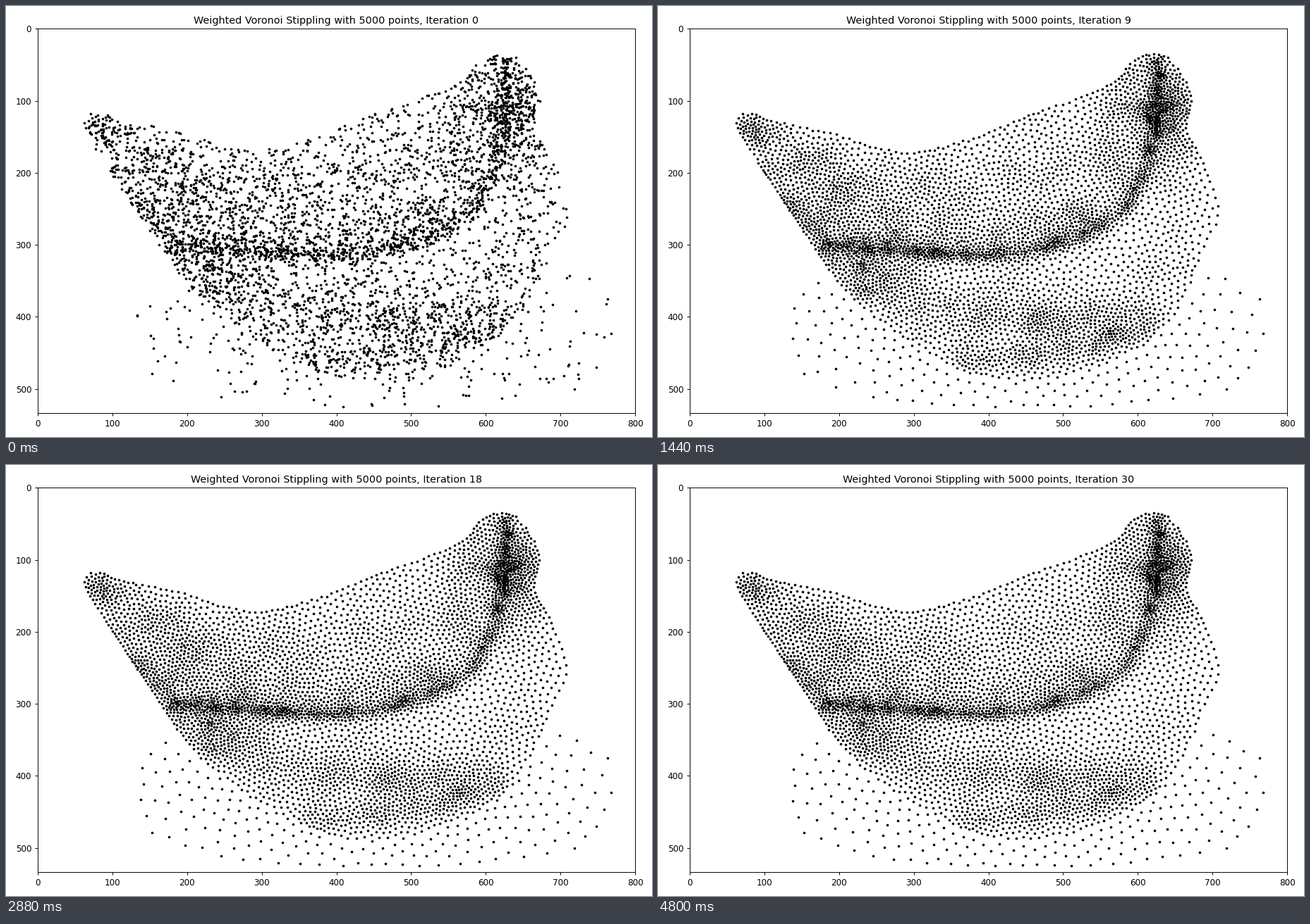
A matplotlib script for the animation above (4960 ms loop, 916 px wide and 612 px high).

```python
from itertools import product

import numpy as np
import matplotlib.pyplot as plt
from matplotlib.animation import FuncAnimation
from matplotlib.path import Path

PX_W, PX_H, DPI = 916, 612, 86.6
W, H = 800, 534
STEPS, DOTS = 31, 5000
DIRS = [d for d in product((-1, 0, 1), repeat=2) if d != (0, 0)]

# key points of smooth curves
OUTLINE = [
    (63, 139), (81, 116), (112, 126), (185, 140), (283, 168), (362, 153),
    (458, 115), (563, 74), (592, 42), (634, 35), (672, 88), (667, 140),
    (690, 184), (712, 252), (690, 306), (624, 423), (487, 484), (364, 472),
    (222, 378), (132, 252)]
RIDGE = [(180, 300), (420, 314), (560, 272), (606, 203), (626, 95), (630, 45)]
CREASE = [(200, 350), (310, 378), (450, 394), (600, 400)]
BELLY = [(370, 465), (475, 455), (615, 415)]
EDGE = [(132, 243), (180, 300)]

Y, X = np.mgrid[:H, :W].astype(float)


def smooth(keys, closed=False, parts=8):
    """Catmull-Rom curve through the key points."""
    p = np.array(keys, float)
    if closed:
        p = np.vstack([p[-1:], p, p[:2]])
    else:
        p = np.vstack([p[:1], p, p[-1:]])
    t = np.arange(parts)[:, None] / parts
    curve = [b + t / 2 * (c - a + t * (2 * a - 5 * b + 4 * c - d
                                       + t * (3 * (b - c) + d - a)))
             for a, b, c, d in zip(p, p[1:], p[2:], p[3:])]
    return np.vstack(curve + [p[-2:-1]])


def distance(line):
    best = np.full((H, W), np.inf)
    for (ax, ay), (bx, by) in zip(line, line[1:]):
        ux, uy = bx - ax, by - ay
        t = (((X - ax) * ux + (Y - ay) * uy) / (ux * ux + uy * uy)).clip(0, 1)
        best = np.minimum(best, np.hypot(X - ax - t * ux, Y - ay - t * uy))
    return best


def stroke(line, width, strength):
    return strength * np.exp(-(distance(line) / width) ** 2)


def blob(x, y, rx, ry, strength):
    return strength * np.exp(-((X - x) / rx) ** 2 - ((Y - y) / ry) ** 2)


def make_density():
    ridge = smooth(RIDGE)
    gap = distance(ridge)
    fruit = .010 + .050 * np.exp(-(gap / 9) ** 2)
    # soft shading on the upper side of the ridge only
    above = Y < np.interp(X, *ridge.T)
    fruit += above * ((610 - X) / 60).clip(0, 1) * .026 * np.exp(-gap / 55)
    fruit += stroke(smooth(CREASE), 24, .012)
    fruit += stroke(smooth(BELLY), 18, .014)
    fruit += stroke(EDGE, 14, .020)
    fruit += blob(88, 138, 28, 26, .034)      # tip
    fruit += blob(150, 220, 130, 90, .009)    # left wing
    fruit += blob(235, 340, 75, 35, .022)     # lower left
    fruit += blob(470, 430, 170, 55, .009)    # underside
    fruit += blob(650, 350, 50, 45, .006)     # right rim
    fruit += blob(634, 112, 42, 65, .050)     # stem

    dx, dy = abs(X - 450) / 322, abs(Y - 420) / 112
    shade = (dx ** 3 + dy ** 3 < 1) * .0065 * np.exp(-1.6 * (dx**2 + dy**2))
    grid = np.column_stack([X.ravel(), Y.ravel()])
    inside = Path(smooth(OUTLINE, closed=True)).contains_points(grid)
    return np.where(inside.reshape(H, W), fruit, shade)


def span(n, d):
    return slice(max(d, 0), n + min(d, 0))


def relax(label, pts, steps):
    """Let every pixel adopt a neighbour's dot if that one is nearer."""
    px, py = pts.T
    for step in steps:
        for dy, dx in DIRS:
            dy, dx = dy * step, dx * step
            own = label[span(H, dy), span(W, dx)]
            other = label[span(H, -dy), span(W, -dx)]
            i, j = np.nonzero(own != other)
            new, old = other[i, j], own[i, j]
            x, y = j + max(dx, 0), i + max(dy, 0)
            nearer = ((px[new] - x) ** 2 + (py[new] - y) ** 2
                      < (px[old] - x) ** 2 + (py[old] - y) ** 2)
            own[i[nearer], j[nearer]] = new[nearer]


def outermost(pts):
    angle = np.linspace(0, 2 * np.pi, 360)
    return np.argmax(pts @ np.array([np.cos(angle), np.sin(angle)]), axis=0)


def stipple():
    rng = np.random.default_rng(7)
    rho = make_density()
    weight = rho.ravel()
    wx, wy = (rho * X).ravel(), (rho * Y).ravel()
    pick = rng.choice(W * H, DOTS, replace=False, p=weight / weight.sum())
    pts = np.column_stack([pick % W, pick // W]).astype(float)
    # dots with unbounded cells stay put
    still = outermost(pts)
    label = np.zeros((H, W), int)
    history = [pts]
    for k in range(1, STEPS):
        col, row = np.rint(pts).astype(int).T
        label[row, col] = np.arange(DOTS)
        relax(label, pts, 2 ** np.arange(8, -1, -1) if k == 1 else (2, 1))
        flat = label.ravel()
        mass, mx, my = (np.bincount(flat, v, DOTS) for v in (weight, wx, wy))
        move = mass > 0
        move[still] = False
        pts = pts.copy()
        pts[move] = np.column_stack([mx[move], my[move]]) / mass[move, None]
        history.append(pts)
    return history


history = stipple()

# the tiny surplus keeps the pixel size from rounding down
fig = plt.figure(figsize=((PX_W + 1e-6) / DPI, (PX_H + 1e-6) / DPI), dpi=DPI)
left, right, top, bottom = 44.6, 892.4, 32.3, 578.4
ax = fig.add_axes([left / PX_W, 1 - bottom / PX_H,
                   (right - left) / PX_W, (bottom - top) / PX_H])
ax.set_xlim(0, W)
ax.set_ylim(H, 0)
dots = ax.scatter(*history[0].T, s=4, c="black")
title = ax.set_title("")


def draw(k):
    dots.set_offsets(history[k])
    title.set_text(f"Weighted Voronoi Stippling with {DOTS} points, Iteration {k}")
    return dots, title


anim = FuncAnimation(fig, draw, frames=STEPS, interval=160, repeat=True,
                     repeat_delay=0, blit=False)
plt.show()
```
